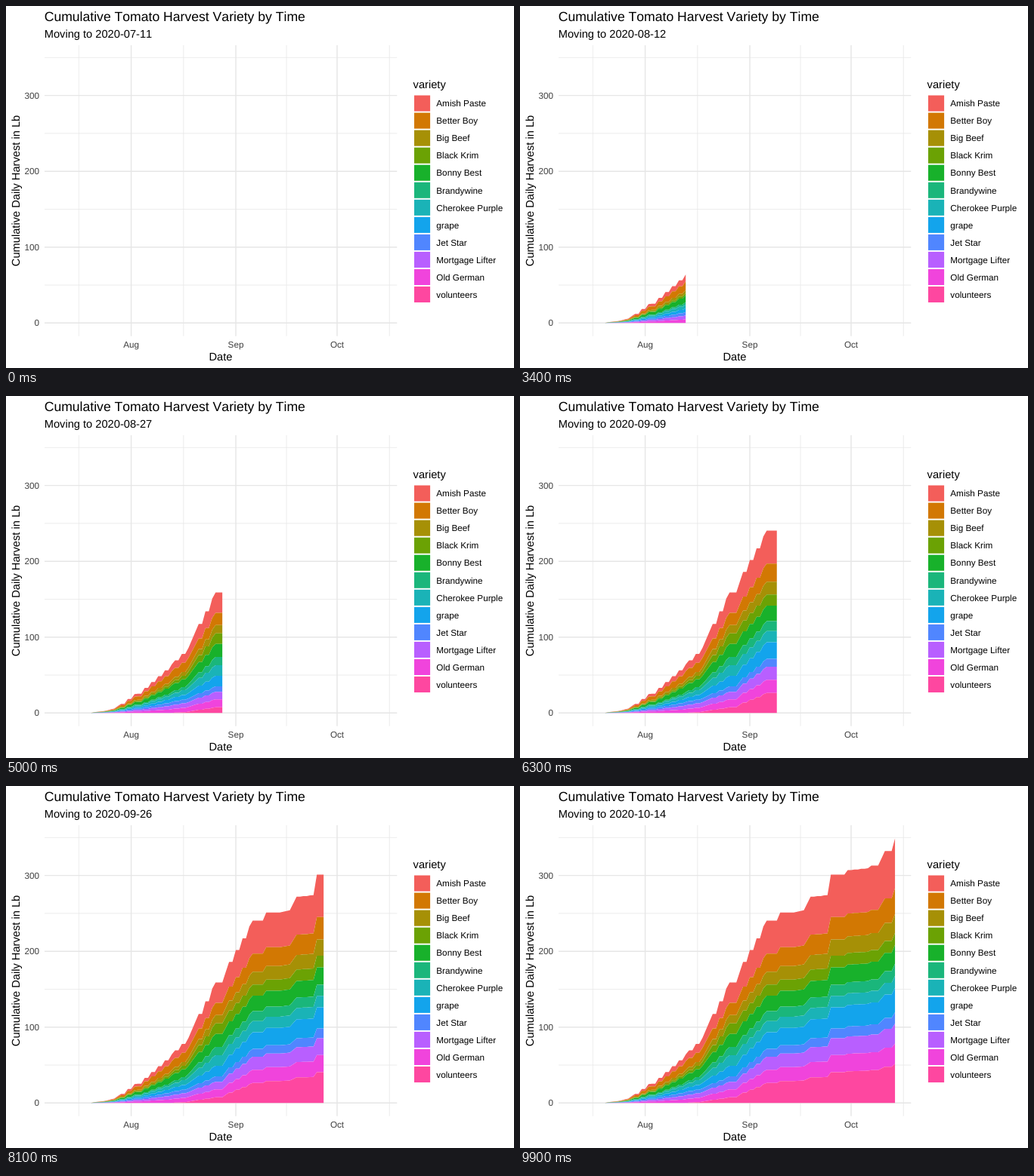
Recreate the animation shown at these times as an HTML page. Size 672 by 480 pixels, loop 10000 ms.

```html
<!DOCTYPE html>
<html lang="en">
<head>
<meta charset="utf-8">
<title>Cumulative Tomato Harvest</title>
<style>
  html, body { margin: 0; width: 100%; height: 100%; overflow: hidden; background: #fff; }
  svg { display: block; width: 672px; height: 480px; }
  text {
    font-family: "Liberation Sans", Arial, sans-serif;
    font-kerning: none;
    text-rendering: geometricPrecision;
  }
</style>
</head>
<body>
<svg id="chart" viewBox="0 0 672 480"></svg>
<script>
const FRAMES = 100, FRAME_MS = 100, LAST_DAY = 95, FIRST_HARVEST = 9;
const START = Date.UTC(2020, 6, 11), DAY_MS = 864e5;

// Pounds of each variety when the whole harvest reaches each stage.
const STAGES = [0, 64, 159, 348.7];
const varieties = [
  { name: "Amish Paste", fill: "#f35e5a", pounds: [0, 9, 27, 65.7] },
  { name: "Better Boy", fill: "#d27803", pounds: [0, 11.5, 16, 34] },
  { name: "Big Beef", fill: "#a69006", pounds: [0, 4, 11, 25] },
  { name: "Black Krim", fill: "#6ba204", pounds: [0, 3, 14, 15.8] },
  { name: "Bonny Best", fill: "#18b12b", pounds: [0, 9, 17, 24.9] },
  { name: "Brandywine", fill: "#1ab67b", pounds: [0, 3, 11, 15.7] },
  { name: "Cherokee Purple", fill: "#1ab3b7", pounds: [0, 5, 14, 15.7] },
  { name: "grape", fill: "#13a4ec", pounds: [0, 5, 14, 32.4] },
  { name: "Jet Star", fill: "#5086ff", pounds: [0, 4.5, 7, 15] },
  { name: "Mortgage Lifter", fill: "#b85fff", pounds: [0, 5, 10, 26.3] },
  { name: "Old German", fill: "#f044dc", pounds: [0, 5, 10.5, 26.7] },
  { name: "volunteers", fill: "#fe47a0", pounds: [0, 0, 7.5, 51.6] }
];

// Turning points of the whole harvest: [day, pounds].
const harvest = [
  [9, 0], [10, 1], [13, 2.5], [16, 5.8], [18, 12], [22, 25], [23, 25.5], [33, 64],
  [34, 69.5], [38, 86], [41, 117.5], [46, 159], [48, 159], [50, 186], [57, 240.5],
  [60, 240.5], [61, 251], [65, 251], [68, 254], [70, 272], [75, 274], [76, 301],
  [80, 301], [81, 307], [87, 309.5], [88, 313], [90, 313], [92, 332], [94, 332], [95, 348.7]
];

const lerp = (a, b, f) => a + (b - a) * f;

// Long climbs rise on every second day only.
function totalOn(day) {
  const i = Math.max(1, harvest.findIndex(([d]) => d >= day));
  const [d0, lb0] = harvest[i - 1], [d1, lb1] = harvest[i];
  let step = day - d0;
  if (d1 - d0 > 3 && day < d1) step -= step % 2;
  return lerp(lb0, lb1, step / (d1 - d0));
}

function poundsAt(variety, total) {
  const i = Math.max(1, STAGES.findIndex(s => s >= total));
  const f = (total - STAGES[i - 1]) / (STAGES[i] - STAGES[i - 1]);
  return lerp(variety.pounds[i - 1], variety.pounds[i], f);
}

const xOf = day => 71.8 + 4.466 * day;
const yOf = lb => 420.3 - 1.0056 * lb;

// Each day lists the heights of all layer borders, from the top down to zero.
const borders = [];
for (let day = FIRST_HARVEST; day <= LAST_DAY; day++) {
  const total = totalOn(day);
  const heights = varieties.reduceRight(
    (tops, v) => [tops[0] + poundsAt(v, total), ...tops], [0]);
  borders.push({ x: xOf(day), heights });
}

const svg = document.getElementById("chart");
function add(tag, attrs, text = "") {
  const el = document.createElementNS("http://www.w3.org/2000/svg", tag);
  for (const key in attrs) el.setAttribute(key, attrs[key]);
  el.textContent = text;
  return svg.appendChild(el);
}
const label = (text, x, y, size, attrs = {}) =>
  add("text", { x, y, "font-size": size, ...attrs }, text);
const grid = (lines, width) =>
  add("path", { d: lines.join(""), stroke: "#e6e6e6", "stroke-width": width });
const vline = day => `M${xOf(day)} 52V437.7`;
const hline = lb => `M51 ${yOf(lb)}H517.3`;

const SMALL = 11.73, MEDIUM = 14.67, LARGE = 17.6;
const tick = { fill: "#3f3f3f" };
const middle = { "text-anchor": "middle" };
const months = [["Aug", 21], ["Sep", 52], ["Oct", 82]];
const pounds = [0, 100, 200, 300];

grid([...[5.5, 36.5, 67, 97.5].map(vline), ...pounds.map(lb => hline(lb + 50))], 0.75);
grid([...months.map(([, day]) => vline(day)), ...pounds.map(hline)], 1.42);

const areas = varieties.map(({ fill }) => add("path", { fill }));

label("Cumulative Tomato Harvest Variety by Time", 50.7, 20, LARGE);
const subtitle = label("", 50.7, 42, MEDIUM);
months.forEach(([name, day]) => label(name, xOf(day), 453, SMALL, { ...tick, ...middle }));
pounds.forEach(lb =>
  label(lb, 44, Math.round(yOf(lb) + 4.1), SMALL, { ...tick, "text-anchor": "end" }));
label("Date", 284, 470, MEDIUM, middle);
label("Cumulative Daily Harvest in Lb", 0, 0, MEDIUM,
  { ...middle, transform: "translate(18 245) rotate(-90)" });

label("variety", 538.6, 109, MEDIUM);
varieties.forEach(({ name, fill }, i) => {
  const y = 129.1 + 23.04 * i;
  add("rect", { x: 540, y: y - 10.6, width: 21.1, height: 21.1, fill });
  label(name, 569.3, Math.round(y + 4.22), SMALL);
});

function areaPath(n, lastDay) {
  const days = borders.slice(0, Math.max(0, lastDay - FIRST_HARVEST + 1));
  if (days.length < 2) return "";
  const edge = k => days.map(({ x, heights }) =>
    `${x.toFixed(2)} ${yOf(heights[k]).toFixed(2)}`);
  return "M" + [...edge(n), ...edge(n + 1).reverse()].join("L") + "Z";
}

let shown = -1;
function render(ms) {
  const frame = Math.floor(ms / FRAME_MS) % FRAMES;
  if (frame === shown) return;
  shown = frame;
  const day = LAST_DAY * frame / (FRAMES - 1);
  const date = new Date(START + Math.floor(day) * DAY_MS).toISOString().slice(0, 10);
  subtitle.textContent = "Moving to " + date;
  areas.forEach((area, n) => area.setAttribute("d", areaPath(n, Math.round(day))));
}

const begin = performance.now();
function loop() {
  render(performance.now() - begin);
  requestAnimationFrame(loop);
}
loop();
</script>
</body>
</html>
```
